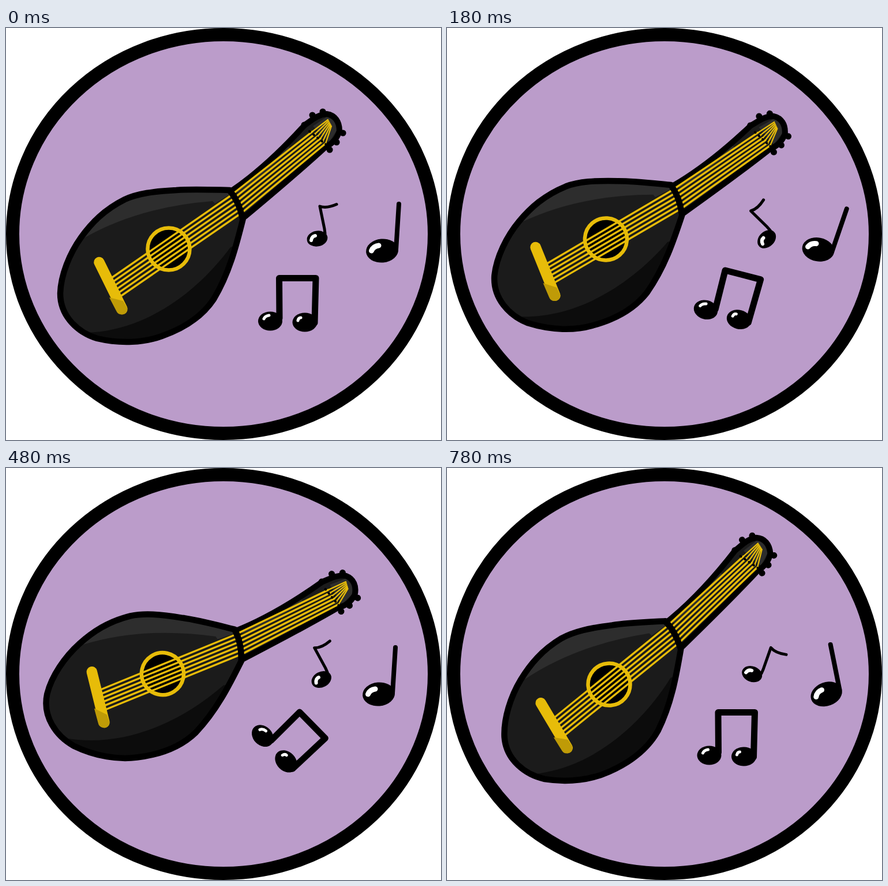
An HTML page that plays this animation: 754x714 px, repeating every 0.9 s.

```html
<!DOCTYPE html>
<html lang="en">
<head>
<meta charset="utf-8">
<title>Lute and notes</title>
<style>
  html, body { margin: 0; width: 100%; height: 100%; overflow: hidden; background: #fff; }
  svg { display: block; width: 100%; height: 100%; }
  .ink, .gold, .shine { fill: none; stroke: #000; stroke-linecap: round; stroke-linejoin: round; }
  .gold { stroke: #e7bc09; }
  .shine { stroke: #fff; }
</style>
</head>
<body>
<svg viewBox="0 0 754 714">
  <defs>
    <path id="body" d="M388 281C345 280 320 279 295 281C255 283 228 287 206 297C170 315 148 338 130 363C110 391 95 428 94 460C94 500 125 528 158 538C200 548 240 545 270 534C310 520 340 500 360 470C387 425 399 378 411 330Q404 300 388 281Z"/>
    <path id="neck" d="M390 283C440 249 480 210 518 168C530 160 540 150 556 149C570 151 578 162 578 178C574 192 566 200 553 207C506 250 456 292 414 327"/>
    <clipPath id="inside"><use href="#body"/></clipPath>
  </defs>

  <ellipse cx="377" cy="357" rx="365.5" ry="345.5" fill="#bb9cca" stroke="#000" stroke-width="23"/>

  <g id="lute">
    <use href="#neck" fill="#1b1b1b"/>
    <path d="M532 170L556 154Q572 158 573 178L560 198Z" fill="#2d2d2d"/>
    <path d="M400 282Q450 248 490 206" fill="none" stroke="#2d2d2d" stroke-width="8"/>
    <g clip-path="url(#inside)">
      <use href="#body" fill="#1b1b1b"/>
      <path d="M395 270H60V400L135 364Q230 310 358 300L362 304L395 284Z" fill="#2d2d2d"/>
      <path d="M140 528C240 525 330 460 389 380L400 376L420 560H140Z" fill="#0c0c0c"/>
    </g>
    <use href="#body" class="ink" stroke-width="10.5"/>
    <use href="#neck" class="ink" stroke-width="10"/>
    <path d="M517 168h.1M531 151h.1M549 145h.1M584 182h.1M573 198h.1M561 211h.1" class="ink" stroke-width="11"/>
    <circle cx="282" cy="383" r="36.5" stroke="#e7bc09" stroke-width="6.5"/>
    <path id="strings" class="gold" stroke-width="3.4"/>
    <path id="fan" class="gold" stroke-width="2.3"/>
    <path d="M526 179L555 202" class="ink" stroke-width="4" stroke-dasharray="1 8"/>
    <path d="M388 282Q404 301 410 330" class="ink" stroke-width="10.5"/>
    <path d="M161.5 406L201.5 487" class="gold" stroke-width="18.5"/>
    <path d="M179 467L203 473L210 485Q211 496 201 496.5Q194 497 191 490Z" fill="#bf9b07"/>
  </g>

  <g id="small">
    <ellipse cx="539.5" cy="365" rx="18" ry="13.5" transform="rotate(-10 539.5 365)"/>
    <path class="ink" stroke-width="5" d="M553 356L552 348L544 309Q556 313 573 305.5"/>
    <path class="shine" stroke-width="6" d="M529 368Q530 361 536 360"/>
  </g>

  <g id="quarter">
    <ellipse cx="652" cy="386" rx="28" ry="20.5" transform="rotate(-5 652 386)"/>
    <path class="ink" stroke-width="8" d="M676 384L681 305"/>
    <path class="shine" stroke-width="9" d="M633.5 386Q637 378 646 377"/>
  </g>

  <g id="pair">
    <ellipse cx="458" cy="508" rx="21" ry="16.5"/>
    <ellipse cx="518" cy="510" rx="21.5" ry="16.5"/>
    <path class="ink" stroke-width="11" d="M474 503L473.5 433.5H537L535 511"/>
    <path class="shine" stroke-width="5" d="M447 504Q449 499 456 498M506 507Q507 502 511 502"/>
  </g>
</svg>
<script>
const LOOP = 900, REST = 780;
const beats = [0, 60, 180, 390, 480, 600, 660, REST];

// Each part swings about a fixed pivot; x and y shift it.
// Tracks hold one value per beat, and the last value stays.
const parts = {
  lute: { pivot: [342.5, 345.9], turn: [0, 0.2, 4.25, 16.3, 12.4, 9.5, 4.9, -4.4], x: [0, -4], y: [0, -3, -12.5] },
  small: { pivot: [548.3, 341.5], turn: [0, 0, -34, -46, -17, 31] },
  quarter: { pivot: [655.5, 353], turn: [0, 0, 15.3, 45.5, 0, -29.7, -42, -15], x: [0, 0, 0, 0, -6, -6, -6, -3], y: [0, 0, 0, 0, 6] },
  pair: { pivot: [493.5, 479.6], turn: [0, 11, 14.5, 30.5, 45.5, 30.5, 20, 0], x: [0, 0, -3.5], y: [0, 0, -10] }
};

const byId = id => document.getElementById(id);
const mix = (a, b, k) => a + (b - a) * k;

// Evenly spread lines between a top and a bottom edge line
function spread(id, top, low, count = 6) {
  let d = "";
  for (let i = 0; i < count; i++) {
    const k = i / (count - 1);
    d += "M" + top.map((p, j) => p.map((v, n) => mix(v, low[j][n], k)).join(" ")).join("L");
  }
  byId(id).setAttribute("d", d);
}

function sample(track = [0], t) {
  const i = beats.findLastIndex(b => b <= t);
  const at = n => track[Math.min(n, track.length - 1)];
  const k = t < REST ? (t - beats[i]) / (beats[i + 1] - beats[i]) : 0;
  return mix(at(i), at(i + 1), k);
}

// The picture holds on twos, and on ones at the two quick moments
function snap(ms) {
  const quick = ms < 120 || (ms >= 360 && ms < 420);
  const step = quick ? 30 : 60;
  return Math.min(REST, Math.floor(ms / step) * step);
}

function render(ms) {
  const t = snap(ms % LOOP);
  for (const [id, { pivot, turn, x, y }] of Object.entries(parts)) {
    byId(id).setAttribute("transform",
      `translate(${sample(x, t)} ${sample(y, t)}) rotate(${sample(turn, t)} ${pivot.join(" ")})`);
  }
}

spread("strings", [[180, 435], [388, 291.5], [531, 179.5]], [[197, 466], [409, 320], [554, 200]]);
spread("fan", [[531, 179.5], [558, 159]], [[554, 200], [564, 170]]);

let start;
function tick(now) {
  start ??= now;
  render(Math.max(0, now - start));
  requestAnimationFrame(tick);
}
render(0);
requestAnimationFrame(tick);
</script>
</body>
</html>
```
